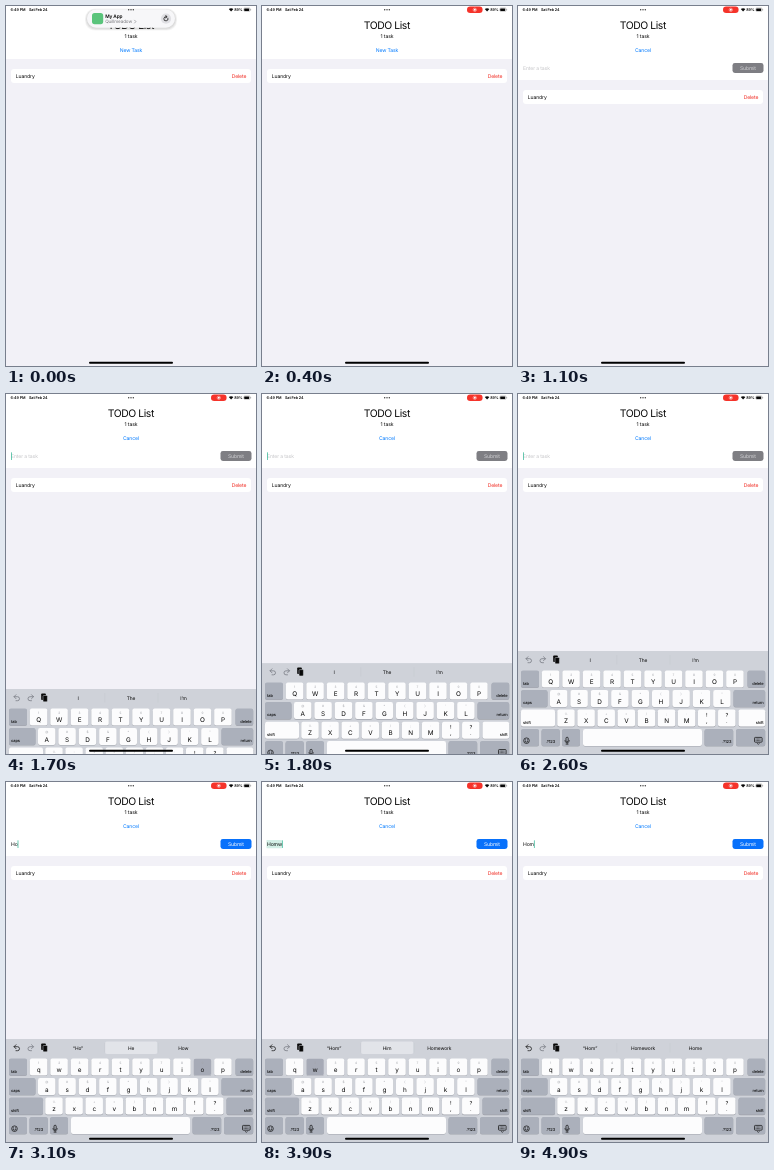
These frames come from a looping animation (250 by 360 pixels, 5 s). An HTML page:

```html
<!DOCTYPE html>
<html lang="en">
<head>
<meta charset="utf-8">
<title>TODO List</title>
<style>
html, body { margin: 0; width: 100%; height: 100%; overflow: hidden; background: #f2f1f7; }
svg { display: block; width: 250px; height: 360px; }
text { font-family: Inter, Roboto, sans-serif; text-rendering: geometricPrecision; letter-spacing: -0.025em; white-space: pre; }
</style>
</head>
<body>
<svg id="stage" viewBox="0 0 250 360" xmlns="http://www.w3.org/2000/svg"></svg>
<script>
const NS = 'http://www.w3.org/2000/svg';
const LOOP = 5000, STEP = 100;
const BLUE = '#007aff', RED = '#f0281f', INK = '#080808', DIM = '#6f727a';
const KEY = '#fcfcfd', MOD = '#abb0bb', CARET = '#45bd9f';
const stage = document.getElementById('stage');

function el(parent, tag, attrs) {
  const node = document.createElementNS(NS, tag);
  set(node, attrs);
  parent.appendChild(node);
  return node;
}
function set(node, attrs) {
  for (const k in attrs) node.setAttribute(k, attrs[k]);
}
const group = parent => el(parent, 'g', {});
const box = (parent, x, y, w, h, r, fill) =>
  el(parent, 'rect', { x, y, width: w, height: h, rx: r, fill });
const line = (parent, d, stroke, width) =>
  el(parent, 'path', { d, fill: 'none', stroke, 'stroke-width': width, 'stroke-linecap': 'round', 'stroke-linejoin': 'round' });

// Text centred vertically on y
function label(parent, x, y, str, size, fill, anchor = 'middle', weight = 400) {
  const t = el(parent, 'text', { x, y: y + size * 0.36, 'font-size': size, fill, 'text-anchor': anchor, 'font-weight': weight });
  t.textContent = str;
  return t;
}
const show = (node, opacity) => node.setAttribute('opacity', opacity);
const move = (node, y) => node.setAttribute('transform', `translate(0 ${y})`);
const clamp = v => Math.max(0, Math.min(1, v));
const ramp = (t, a, b) => clamp((t - a) / (b - a));
const easeOut = p => 1 - (1 - p) ** 2;
const latest = (list, t) => list.reduce((found, item) => item[0] <= t ? item : found);

// Page
box(stage, 0, 0, 250, 360, 0, '#f2f1f7');
const header = box(stage, 0, 0, 250, 53, 0, '#fff');
const row = group(stage);
box(row, 5, 63, 240, 14, 3, '#fff');
label(row, 9.8, 70.2, 'Luandry', 5.1, INK, 'start');
label(row, 240.3, 70.2, 'Delete', 5.1, RED, 'end');

label(stage, 124.8, 19, 'TODO List', 10.4, INK).style.letterSpacing = '-0.04em';
label(stage, 125, 30, '1 task', 5.1, INK);
const newTask = label(stage, 125, 44.6, 'New Task', 5.1, BLUE);
const cancel = label(stage, 125, 44.6, 'Cancel', 5.1, BLUE);

// Entry row
const entry = group(stage);
const mark = box(entry, 4.5, 58, 16, 8.3, 0.6, '#d3efe6');
const hint = label(entry, 5, 62.2, 'Enter a task', 5.1, '#c6c6c9', 'start');
const typed = label(entry, 5, 62.2, '', 5.1, INK, 'start');
const caret = box(entry, 5, 58.2, 0.8, 7.8, 0.3, CARET);
const button = box(entry, 214.5, 57, 31, 10, 2.4, '#7e7e83');
const submit = label(entry, 229.9, 62.2, 'Submit', 5.1, '#fff');

// Keyboard
const board = group(stage);
box(board, 0, 257, 250, 110, 0, '#cfd2d9');
const pick = box(board, 99, 259.5, 52.5, 12.5, 2, '#e2e4e9');
for (const x of [98.7, 151.8]) box(board, x, 261, 0.4, 9.5, 0, '#c3c6cd');
const words = [72, 125, 177.4].map(x => label(board, x, 265.8, '', 4.9, INK));
const undo = line(board, 'M10 262.7L8 264.7L10 266.7M8.2 264.7H11.5a2 2 0 0 1 0 4H10', INK, 0.7);
line(board, 'M25.5 262.7L27.5 264.7L25.5 266.7M27.3 264.7H24a2 2 0 0 0 0 4H25.5', DIM, 0.7);
box(board, 35.2, 261.4, 4.6, 6.6, 0.8, INK);
set(box(board, 37, 263.5, 4.4, 6.3, 0.8, INK), { stroke: '#cfd2d9', 'stroke-width': 0.5 });

function key(x, y, w, fill) {
  box(board, x, y + 0.6, w, 17, 2, '#a0a3ab');
  return box(board, x, y, w, 17, 2, fill);
}
const modKey = (x, y, w, str, tx, anchor = 'start') => {
  const face = key(x, y, w, MOD);
  label(board, tx, y + 12.7, str, 4, INK, anchor, 500);
  return face;
};

const letters = {};
function keyRow(y, first, pitch, chars, hints) {
  [...chars].forEach((c, i) => {
    const x = first + i * pitch;
    key(x - 8.75, y, 17.5, KEY);
    const press = box(board, x - 8.75, y, 17.5, 17, 2, '#a6aab6');
    label(board, x, y + 4.2, hints[i], 3.2, '#a3a5ab');
    letters[c] = { press, text: label(board, x, y + 11.2, c, 6.4, INK) };
  });
}
const R1 = 276.4, R2 = 296, R3 = 315.6, R4 = 335;
modKey(3, R1, 18, 'tab', 5);
keyRow(R1, 32.6, 20.48, 'qwertyuiop', '1234567890');
const del = modKey(229.5, R1, 17.7, 'delete', 245.6, 'end');
modKey(3, R2, 26.5, 'caps', 5);
keyRow(R2, 40.7, 20.4, 'asdfghjkl', '@#$&*()\'"');
modKey(215.5, R2, 31.7, 'return', 245.6, 'end');
const shifts = [modKey(3, R3, 34, 'shift', 5), modKey(220.5, R3, 26.7, 'shift', 245.6, 'end')];
keyRow(R3, 48, 20.1, 'zxcvbnm', '%-+=/;:');
[['!', ',', 188.7], ['?', '.', 208.8]].forEach(([top, low, x]) => {
  key(x - 8.75, R3, 17.5, KEY);
  label(board, x, R3 + 5.4, top, 5.6, INK);
  label(board, x, R3 + 11.6, low, 5.6, INK);
});
key(3, R4, 18, MOD);
modKey(23.5, R4, 18.3, '.?123', 32.6, 'middle');
key(44, R4, 18, MOD);
key(65, R4, 119, KEY);
modKey(186.5, R4, 28.7, '.?123', 213.4, 'end');
key(218, R4, 29.2, MOD);

// Emoji, microphone and hide-keyboard icons
el(board, 'circle', { cx: 8.5, cy: 346.7, r: 2.8, fill: 'none', stroke: INK, 'stroke-width': 0.7 });
line(board, 'M7.5 345.8v.3M9.5 345.8v.3M7 347.5q1.5 1.7 3 0', INK, 0.7);
set(box(board, 48, 343.2, 2.2, 4.4, 1.1, 'none'), { stroke: INK, 'stroke-width': 0.7 });
line(board, 'M46.9 346.4q0 2.4 2.2 2.4t2.2-2.4M49.1 348.8v1.3M48 350.1h2.2', INK, 0.6);
set(box(board, 236.5, 343.4, 7.6, 4.8, 0.8, 'none'), { stroke: INK, 'stroke-width': 0.7 });
line(board, 'M238 345h4.6M238 346.6h4.6', INK, 0.6).setAttribute('stroke-dasharray', '.2 1.1');
line(board, 'M239.2 349.4l1.1 .9l1.1-.9', INK, 0.6);

box(stage, 83, 355.8, 84, 1.9, 0.95, '#000');

// Banner
const banner = group(stage);
for (let i = 4; i > 0; i--) {
  box(banner, 81 - i * 0.5, 3.8 - i * 0.3, 88 + i, 18 + i, 9.5, '#000').setAttribute('opacity', 0.04);
}
box(banner, 81, 3.3, 88, 18.4, 9.2, '#f7f7f9');
box(banner, 86, 7, 11.2, 11.2, 2.6, '#5ac47b');
label(banner, 99.2, 10, 'My App', 4.8, INK, 'start', 600);
label(banner, 99.2, 15.5, 'Quillmeadow', 4.6, '#77777c', 'start');
line(banner, 'M128.6 14.2l1.3 1.4l-1.3 1.4', '#77777c', 0.6);
el(banner, 'circle', { cx: 160, cy: 12.7, r: 5.1, fill: '#e0e0e4' });
line(banner, 'M162 12.2a2.1 2.1 0 1 1-1.3-1.4M159.8 9.4l1.2 1.4l-1.5 1', INK, 0.7);

// Status bar
label(stage, 4.6, 3.6, '6:49 PM', 3.8, INK, 'start', 600);
label(stage, 23, 3.6, 'Sat Feb 24', 3.8, INK, 'start', 600);
for (const x of [122.7, 125, 127.3]) el(stage, 'circle', { cx: x, cy: 3.7, r: 0.7, fill: '#333' });
const rec = group(stage);
box(rec, 205, 0.6, 15.6, 6.4, 3.2, '#f5332a');
el(rec, 'circle', { cx: 212.8, cy: 3.8, r: 1.7, fill: 'none', stroke: '#fff', 'stroke-width': 0.4 });
const dot = el(rec, 'circle', { cx: 212.8, cy: 3.8, r: 1, fill: '#fff' });
el(stage, 'path', { d: 'M225.1 5.6l-2.3-2.5q2.3-1.9 4.6 0z', fill: INK });
label(stage, 228.2, 3.6, '89%', 3.8, INK, 'start', 600);
set(box(stage, 237.8, 2, 6.4, 3.3, 1, 'none'), { stroke: '#777', 'stroke-width': 0.4 });
box(stage, 238.2, 2.4, 5, 2.5, 0.6, INK);
box(stage, 244.6, 3.1, 0.5, 1.1, 0.2, '#777');

// Script of the typing: [time, value...]
const TEXT = [[0, ''], [2900, 'H'], [3100, 'Ho'], [3500, 'Hom'], [3900, 'Homw'], [4800, 'Hom']];
const WORDS = [
  [0, 'I', 'The', 'I’m'],
  [2900, '“H”', 'He', 'How'],
  [3100, '“Ho”', 'He', 'How', true],
  [3600, '“Hom”', 'Him', 'Homework', true],
  [4100, '“Homw”', 'Home', 'Homework', true],
  [4800, '“Hom”', 'Homework', 'Home']
];
const PRESSES = { h: 2800, o: 3000, m: 3400, w: 3800 };

function blink(t) {
  if (t < 2700) return 1 - ramp(t, 2200, 2400) + ramp(t, 2400, 2600);
  return t < 4800 ? 1 - ramp(t, 4300, 4500) : 1;
}

function draw(t) {
  const away = ramp(t, 0, 400);
  move(banner, -27 * away * away);
  show(banner, 1 - ramp(t, 200, 400));
  show(rec, ramp(t, 100, 400));
  dot.setAttribute('opacity', 0.4 + 0.6 * blink(t));

  const open = easeOut(ramp(t, 700, 1100));
  header.setAttribute('height', 53 + 21 * open);
  move(row, 21 * open);
  show(newTask, 1 - open);
  show(cancel, open);
  show(entry, open);

  // Critically damped rise
  const k = Math.max(0, t - 1560) * 0.0154;
  move(board, 104 * (1 + k) * Math.exp(-k));

  const text = latest(TEXT, t)[1];
  typed.textContent = text;
  const end = text ? 5 + typed.getComputedTextLength() : 5;
  caret.setAttribute('x', end);
  show(caret, t < 1600 ? 0 : blink(t));
  show(hint, text ? 0 : 1);
  mark.setAttribute('width', Math.max(0, end - 4.5));
  show(mark, text === 'Homw' ? 1 : 0);
  button.setAttribute('fill', text ? '#0871fb' : '#7e7e83');
  submit.setAttribute('fill', text ? '#fff' : '#d2d2d5');
  undo.setAttribute('stroke', text ? INK : DIM);

  const [, a, b, c, chosen] = latest(WORDS, t);
  [a, b, c].forEach((word, i) => { words[i].textContent = word; });
  show(pick, chosen ? 1 : 0);

  for (const ch in letters) {
    const { press, text: face } = letters[ch];
    face.textContent = text ? ch : ch.toUpperCase();
    const since = t - PRESSES[ch];
    show(press, since >= 0 ? 1 - ramp(since, 100, 300) : 0);
  }
  for (const s of shifts) s.setAttribute('fill', text ? MOD : KEY);
  del.setAttribute('fill', t >= 4800 && t < 4900 ? KEY : MOD);
}

const start = performance.now();
function tick() {
  const t = (performance.now() - start) % LOOP;
  draw(Math.floor(t / STEP) * STEP);
  requestAnimationFrame(tick);
}
tick();
</script>
</body>
</html>
```
